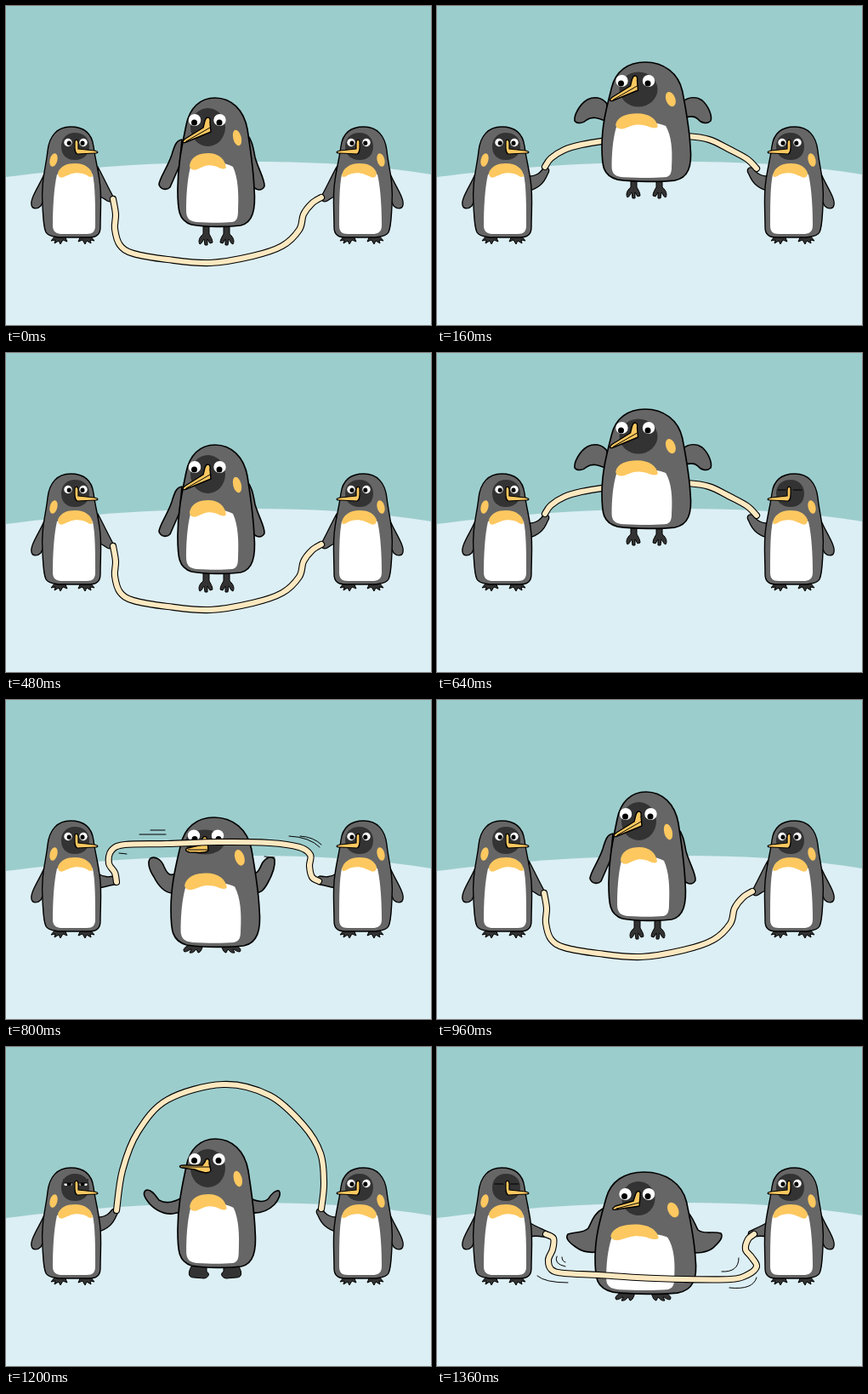
Recreate the animation shown at these times as an HTML page. Size 500 by 375 pixels, loop 1440 ms.

```html
<!DOCTYPE html>
<html lang="en">
<head>
<meta charset="utf-8">
<title>Penguins skipping rope</title>
<style>
html, body { margin: 0; width: 100%; height: 100%; overflow: hidden; background: #9ccdcd; }
svg { display: block; width: 100%; height: 100%; }
</style>
</head>
<body>
<svg id="stage" viewBox="0 0 500 375" stroke-linejoin="round" stroke-linecap="round">
  <rect width="500" height="375" fill="#9ccdcd"/>
  <path fill="#dceff5" d="M0 201C80 191 170 183 290 183C370 183 440 188 500 198V375H0Z"/>
  <g id="scene"></g>
</svg>
<script>
const STEP = 80, STEPS = 18;
const GREY = '#666', DARK = '#333', GOLD = '#fdc860', CREAM = '#fce8c0', INK = '#000';

const shape = (d, fill, line = 0) =>
  `<path d="${d}" fill="${fill}" stroke="${line ? INK : 'none'}" stroke-width="${line}" vector-effect="non-scaling-stroke"/>`;
const oval = (x, y, rx, ry, fill, turn = 0) =>
  `<ellipse cx="${x}" cy="${y}" rx="${rx}" ry="${ry}" fill="${fill}" transform="rotate(${turn} ${x} ${y})"/>`;
const group = (transform, content) => `<g transform="${transform}">${content}</g>`;

// Smooth curve through "x,y x,y ..." points
function spline(text) {
  const p = text.split(' ').map(s => s.split(',').map(Number));
  let d = 'M' + p[0];
  for (let i = 0; i < p.length - 1; i++) {
    const a = p[i - 1] || p[i], b = p[i], c = p[i + 1], e = p[i + 2] || c;
    const c1 = b.map((v, k) => v + (c[k] - a[k]) / 6);
    const c2 = c.map((v, k) => v - (e[k] - b[k]) / 6);
    d += `C${c1} ${c2} ${c}`;
  }
  return d;
}

const rope = points => {
  const d = spline(points);
  const stroke = (color, w) => `<path d="${d}" fill="none" stroke="${color}" stroke-width="${w}"/>`;
  return stroke(INK, 8.2) + stroke(CREAM, 6);
};

// Turners: drawn facing right, mirrored for the other side
const ARM = {
  down: 'M108 189C115 202 121 215 126 224C127 229 123 231 119 229C115 226 113 225 109 223Z',
  up: 'M108 200C118 200 122 195 125 191C130 188 134 192 130 198C126 208 118 215 108 217Z',
  out: 'M108 204C116 209 122 208 128 207C133 209 133 215 128 217C120 218 113 221 108 221Z',
  low: 'M108 206C116 211 124 214 130 217C132 221 129 225 124 223C119 222 114 222 108 223Z'
};
const SIDE_FOOT = 'M58 270L53 276L58 275L57 279L62 276L64 280L67 275L72 277L69 270Z';

function turnerEyes(lid) {
  if (lid === 2) return shape('M68 161H78M87 161H96', 'none', 1.2);
  const eyes = [73, 91].map((x, i) =>
    oval(x, 160.5, 4.7, 4.7, '#fff') + oval(i ? x - 1 : x + 1.2, 161.2, 2.5, 2.6, INK)).join('');
  const lids = shape('M67 155H79V160H67ZM85 155H97V160H85ZM67 163H79V167H67ZM85 163H97V167H85Z', DARK)
    + shape('M68 160H78M86 160H96', 'none', 1.1);
  return eyes + (lid ? lids : '');
}

function turner(arm, lid) {
  return shape('M48 190C42 208 28 225 30 234C31 239 37 239 41 235L47 222Z', GREY, 1.3)
    + shape(ARM[arm], GREY, 1.3)
    + shape(SIDE_FOOT, DARK, 1) + group('translate(157 0) scale(-1 1)', shape(SIDE_FOOT, DARK, 1))
    + shape('M76 142C60 142 51 153 49 170C47 190 41 205 43 235C44 252 44 260 47 266C50 271 57 271 62 272L98 272C106 272 111 268 111 260C111 240 113 222 110 205C108 190 105 180 103 165C101 150 92 142 76 142Z', GREY, 1.4)
    + shape('M60 198C56 215 55 240 55 258C55 266 60 268 66 268L95 268C102 268 105 265 105 258C105 235 105 212 102 198C95 192 70 192 60 198Z', '#fff')
    + shape('M61 196C64 188 72 185 81 185C93 185 101 191 102 200C98 203 96 198 90 197C80 195 75 198 68 201C63 203 61 200 61 196Z', GOLD)
    + oval(56, 181, 4.4, 8, GOLD, 14)
    + shape('M81 149C71 149 65 156 65 165C65 175 71 181 81 181C92 181 98 174 98 165C98 155 91 149 81 149Z', DARK)
    + turnerEyes(lid)
    + shape('M81 159C82 156 85 157 85 161L85 168L104 170C109 171 109 173 105 173L84 174C80 173 81 166 81 159Z', GOLD, 1.2);
}

// Jumper
const BODY = 'M246 108C228 108 216 120 212 140C208 160 202 185 202 215C202 240 203 252 218 257C235 260 262 260 276 258C290 255 294 240 292 215C291 190 287 165 284 145C280 122 265 108 246 108Z';
const BELLY = 'M217 189C213 205 212 225 212 240C212 250 216 253 224 254C240 255 255 255 266 254C272 253 273 248 273 240C274 220 273 202 267 189C255 182 230 182 217 189Z';
const BIB = 'M216 187C218 177 227 173 238 173C250 173 258 180 259 190C255 194 250 189 245 188C236 186 232 189 225 192C219 194 216 191 216 187Z';
const FOOT = {
  hang: 'M-3 0L-3 9C-8 13 -9 18 -7 21C-4 20 -4 17 -2 15L-1 22L2 22L2 15L5 20L8 19C8 15 5 11 4 9L4 0Z',
  flat: 'M-6 0C-12 3 -16 6 -13 9C-9 9 -7 6 -5 6L-7 10C-3 11 -1 8 1 6L3 10C6 10 8 5 9 0Z',
  land: 'M-9 -2C-13 5 -13 11 -6 11L6 12C12 11 13 6 9 4L9 -2Z'
};
const BEAK = ['M234 135C236 129 241 130 240 137L241 148L212 160C207 162 207 159 211 156L232 143Z', 'M212 159L240 143'];

// box: left, top, right, bottom; eyes: two centres and height; look: pupil shift
const hang = {
  box: [202, 108, 292, 259], mask: [237.5, 142.5, 20.5, 22.5], eyes: [222, 251.5, 134], look: [-.5, 3],
  beak: BEAK, shift: [0, 0], foot: 'hang', feet: [235, 260, 259],
  left: 'M207 157C200 158 198 165 195 175C190 190 180 203 180 210C182 216 189 217 193 213L204 188Z',
  right: 'M283 150C290 158 291 168 293 178C297 192 305 205 304 212C301 218 294 217 290 211L286 180Z',
  rope: '126,227 129,245 128,262 134,281 150,291 190,298 240,302 290,294 325,282 345,263 350,245 360,232 371,225',
  arm: 'down'
};
const rise = {
  box: [199, 86, 294, 233], mask: [237, 119, 22, 22], eyes: [220, 250, 111], look: [-1, 3],
  beak: BEAK, shift: [-2, -25], foot: 'hang', feet: [233, 261, 232],
  left: 'M205 136C196 135 189 142 181 151C172 160 167 168 169 173C174 178 182 176 188 170L202 162Z',
  right: 'M287 136C296 135 304 144 311 153C317 162 320 169 318 174C313 178 306 176 301 170L290 161Z',
  rope: '128,220 137,226 136,240 132,252 140,262 170,267 235,270 300,270 345,268 366,258 365,240 363,229 371,220',
  arm: 'low', behind: true
};
const peak = {
  box: [194, 66, 298, 206], mask: [237, 98, 22.5, 20.5], eyes: [217.5, 249, 88], look: [-1, 3],
  beak: BEAK, shift: [-4.5, -49], foot: 'hang', feet: [231, 262, 204],
  left: 'M200 115C194 107 185 106 177 110C167 116 161 129 162 135C165 139 172 138 176 134C183 129 190 132 200 136Z',
  right: 'M288 113C296 107 305 106 312 111C320 118 324 130 322 135C318 139 311 138 307 133C302 128 296 130 288 132Z',
  rope: '127,189 134,179 150,169 170,163 200,158 245,152 294,153 320,157 345,169 365,180 376,191',
  arm: 'up', behind: true
};
const land = {
  box: [202, 108, 293, 259], mask: [237.5, 142.5, 20.5, 22.5], eyes: [222, 250.5, 132], look: [-.5, 1.5],
  beak: ['M234 135C235 130 240 130 239 137L241 145C239 150 228 147 222 144L207 142C203 141 204 139 208 139L231 139Z', 'M207 141L240 141'],
  shift: [0, 0], foot: 'land', feet: [227, 265, 260],
  left: 'M207 177C197 183 187 184 180 180C176 175 172 168 166 168C162 169 161 173 165 179C172 190 184 197 196 196L206 194Z',
  right: 'M286 177C297 183 304 183 309 178C312 173 317 168 321 169C324 172 321 179 316 185C308 193 299 196 288 195Z',
  rope: '130,192 137,145 155,100 190,62 255,44 310,57 350,92 370,125 374,160 371,190',
  arm: 'up', behind: true
};
const stand = {
  box: [194, 138, 298, 290], mask: [234, 167, 23, 14.5], eyes: [221, 249, 159.5], look: [1, 4],
  beak: ['M231 163C233 159 237 160 237 166L238 177C234 181 225 179 216 179C211 178 210 175 214 174L231 170Z', 'M214 176L237 176'],
  shift: [0, 0], foot: 'flat', feet: [223, 262, 287],
  left: 'M202 203C193 208 190 205 186 196C183 188 176 183 170 186C166 190 168 199 174 208C179 218 186 226 195 227L202 220Z',
  right: 'M288 203C297 206 298 198 302 191C306 185 312 183 316 187C317 195 313 206 308 215C303 224 299 228 291 226Z',
  rope: '130,214 128,203 121,192 124,177 140,170 190,169 250,167 310,168 345,173 358,182 357,195 360,208 368,213',
  arm: 'out',
  swish: 'M170 153H187M157 158H188M133 180L142 181M333 160Q357 161 369 173M346 160Q362 161 371 170M304 184L316 185'
};
const squash = {
  box: [186, 147, 304, 290], mask: [237, 178, 19.5, 20], eyes: [221.5, 249, 173], look: [-1, 2.5],
  beak: ['M234 172C236 168 240 169 239 174L238 187L211 191C206 192 205 190 210 187L231 181Z', 'M211 190L238 183'],
  shift: [0, 0], foot: 'flat', feet: [224, 261, 288],
  left: 'M195 190C184 196 182 206 178 213C173 219 163 217 154 220C150 225 157 231 163 235C171 241 180 242 188 241L195 225Z',
  right: 'M291 190C301 198 303 208 307 215C314 221 325 216 334 219C338 224 330 231 325 236C317 242 306 243 298 241Z',
  rope: '128,220 137,225 136,238 131,250 135,262 150,266 190,268 235,271 290,273 345,273 365,268 376,258 370,247 363,238 366,226 373,220',
  arm: 'low',
  swish: 'M141 246Q137 255 151 258M147 247Q147 252 151 253M118 269Q127 277 154 277M335 264Q355 265 355 248M344 283Q372 286 376 271'
};
const CYCLE = [hang, rise, peak, land, stand, squash];

function jumper(p) {
  const [l, t, r, b] = p.box, sx = (r - l) / 90, sy = (b - t) / 151;
  const [fx1, fx2, fy] = p.feet, foot = shape(FOOT[p.foot], DARK, 1);
  const [ex1, ex2, ey] = p.eyes, [lx, ly] = p.look;
  const eye = x => oval(x, ey, 7.2, 7, '#fff') + oval(x + lx, ey + ly, 3.5, 3.6, INK);
  return group(`translate(${fx1} ${fy})`, foot)
    + group(`translate(${fx2} ${fy}) scale(-1 1)`, foot)
    + shape(p.left, GREY, 1.6) + shape(p.right, GREY, 1.6)
    + group(`translate(${l} ${t}) scale(${sx} ${sy}) translate(-202 -108)`,
      shape(BODY, GREY, 1.7) + shape(BELLY, '#fff') + shape(BIB, GOLD) + oval(272, 155, 4.8, 9.5, GOLD, -14))
    + oval(...p.mask, DARK)
    + eye(ex1) + eye(ex2)
    + group(`translate(${p.shift})`, shape(p.beak[0], GOLD, 1.4) + shape(p.beak[1], 'none', 1));
}

// 0 open, 1 half, 2 shut; a blink lasts three steps
const blink = (i, start) => i === start ? 1 : i > start && i < start + 3 ? 2 : 0;

function draw(i) {
  const p = CYCLE[i % CYCLE.length], cord = rope(p.rope);
  return turner(p.arm, blink(i, 15))
    + group('translate(497 0) scale(-1 1)', turner(p.arm, blink(i, 7)))
    + (p.behind ? cord + jumper(p) : jumper(p) + cord)
    + (p.swish ? shape(p.swish, 'none', 1) : '');
}

const scene = document.getElementById('scene');
let shown = -1;
function tick() {
  const i = Math.floor(performance.now() / STEP) % STEPS;
  if (i !== shown) scene.innerHTML = draw(shown = i);
  requestAnimationFrame(tick);
}
tick();
</script>
</body>
</html>
```
